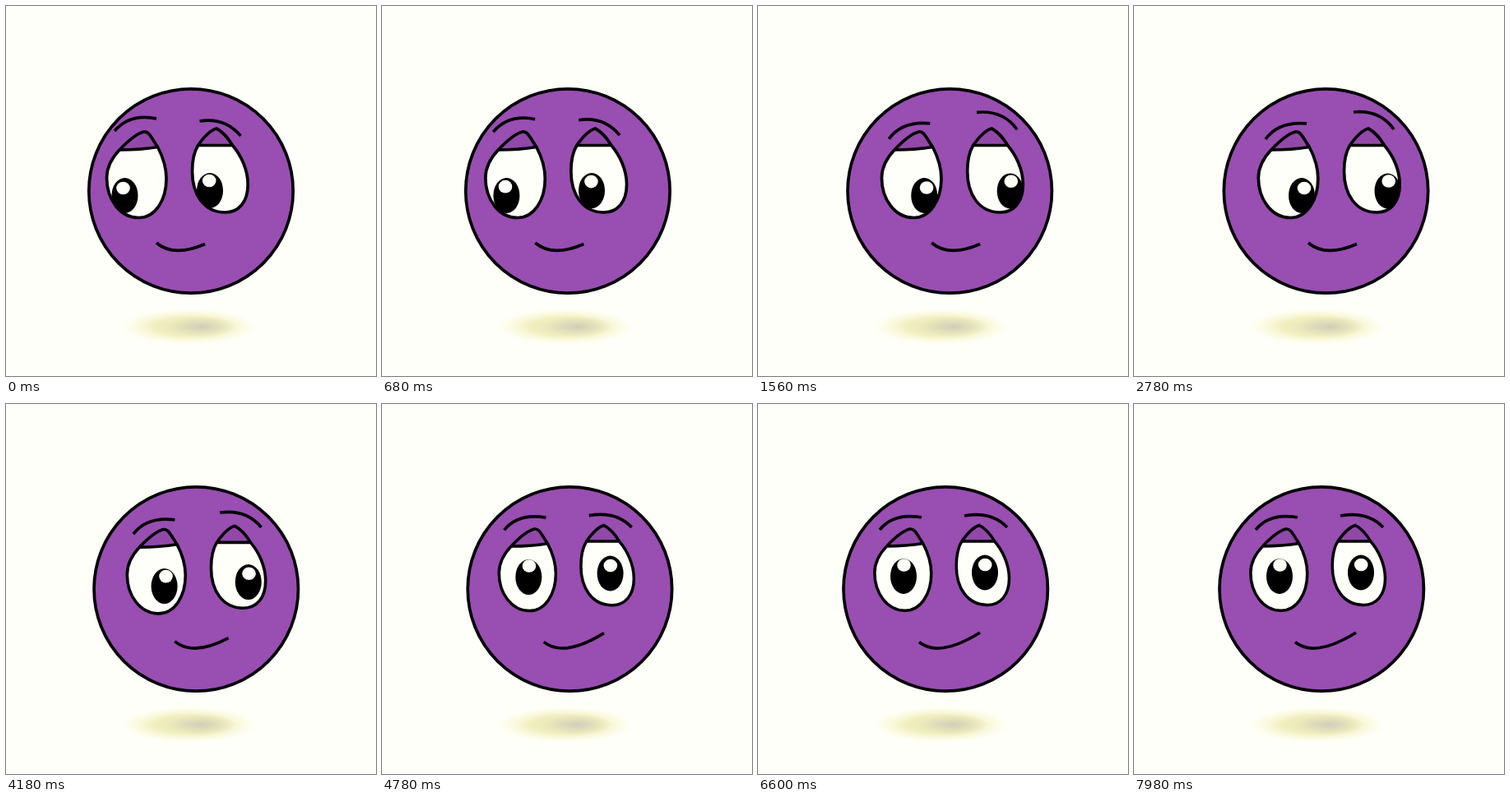
An HTML page for the animation above (8 s loop, 450 px wide and 450 px high).

```html
<!DOCTYPE html>
<html lang="en">
<head>
<meta charset="utf-8">
<title>Purple face</title>
<style>
  html, body { margin: 0; width: 100%; height: 100%; overflow: hidden; background: #fffffa; }
  svg { display: block; width: 100%; height: 100%; }
  .line { fill: none; stroke: #000; stroke-width: 3.7; }
  .white { fill: #fffffa; }
  .lid { fill: #9148a9; }
</style>
</head>
<body>
<svg viewBox="0 0 450 450">
  <defs>
    <radialGradient id="glow">
      <stop offset="0" stop-color="#e6e4b8"/>
      <stop offset=".5" stop-color="#efedb8" stop-opacity=".9"/>
      <stop offset="1" stop-color="#fbf9c8" stop-opacity="0"/>
    </radialGradient>
    <radialGradient id="core">
      <stop offset="0" stop-color="#cfcdb8"/>
      <stop offset="1" stop-color="#dcdab8" stop-opacity="0"/>
    </radialGradient>
    <path id="shapeL" d="M-21.5 22C-12 12 0 2 8 0C14 -1 16 5 25 18.5C31 30 35.5 44 35.5 57C35.5 83 22 104.5 2 104.5C-21 104.5 -37 82 -37 56C-37 43 -30 31 -21.5 22Z"/>
    <path id="shapeR" d="M-27 20.5C-21 12 -12 2 -4.5 0C3 4 10 12 15 20.5C25 32 33.7 50 33.7 68C33.7 90 22 102 6 102C-20 102 -34 80 -34 52C-34 40 -32 29 -27 20.5Z"/>
    <clipPath id="clipL"><use href="#shapeL"/></clipPath>
    <clipPath id="clipR"><use href="#shapeR"/></clipPath>
  </defs>
  <rect width="450" height="450" class="white"/>
  <ellipse cx="223" cy="390" rx="84" ry="22" fill="url(#glow)"/>
  <ellipse cx="238" cy="390" rx="42" ry="13" fill="url(#core)"/>
  <circle id="head" cy="225" r="124.2" fill="#994eb2" stroke="#000" stroke-width="3.7"/>
  <g id="eyeL">
    <use href="#shapeL" class="white"/>
    <g clip-path="url(#clipL)">
      <path class="lid" d="M-21.5 22Q4 22 25 18.5L40 -5H-40Z"/>
      <g id="pupilL"><ellipse rx="16" ry="21.5"/><ellipse id="glintL" class="white" rx="8.3" ry="7.8"/></g>
    </g>
    <path class="line" d="M-21.5 22Q4 22 25 18.5"/>
    <use href="#shapeL" class="line"/>
  </g>
  <g id="eyeR">
    <use href="#shapeR" class="white"/>
    <g clip-path="url(#clipR)">
      <path class="lid" d="M-27 20.5H15L40 -5H-40Z"/>
      <g id="pupilR"><ellipse rx="16" ry="21.5"/><ellipse id="glintR" class="white" rx="8.3" ry="7.8"/></g>
    </g>
    <path class="line" d="M-27 20.5H15"/>
    <use href="#shapeR" class="line"/>
  </g>
  <path id="browL" class="line"/>
  <path id="browR" class="line"/>
  <path id="mouth" class="line"/>
</svg>
<script>
const LOOP = 8000;
const $ = id => document.getElementById(id);

// head: x, look, eye scale; curves: start, control, end
const left = {
  head: [225, -1, 1], eyes: [159.5, 153, 260.5, 149], pupils: [144.5, 230.5, 248, 224.5],
  browL: [132, 152, 151, 130, 183, 137], browR: [235.5, 140, 266, 135, 285.5, 158],
  mouth: [183, 288, 204, 306, 242, 289.5]
};
const right = {
  head: [233.5, 1, 1], eyes: [188.3, 153, 289.5, 149], pupils: [204, 230.5, 308.5, 225],
  browL: [160, 162, 176, 140, 210, 143], browR: [267, 129, 299, 126, 316, 150],
  mouth: [212, 288, 233, 306, 271, 289.5]
};
const front = {
  head: [228.2, 0, .95], eyes: [177, 152, 273.5, 147.5], pupils: [177, 209.5, 276, 205],
  browL: [148, 153, 165, 132, 199, 138], browR: [251, 136, 284, 130, 303, 150],
  mouth: [196, 289.5, 220, 309, 270, 278]
};

// Steps come in threes: one held for 100 ms, then two of 20 ms.
function stepAt(t) {
  const round = Math.floor((t - 20) / 140);
  const rest = t - 20 - round * 140;
  return 3 * round + 1 + (rest >= 100) + (rest >= 120);
}

// cubic-bezier(.25, .1, .25, 1)
function ease(x) {
  if (x <= 0) return 0;
  if (x >= 1) return 1;
  const bezier = (s, a, b) => 3 * s * (1 - s) * ((1 - s) * a + s * b) + s ** 3;
  let lo = 0, hi = 1;
  for (let i = 0; i < 20; i++) {
    const mid = (lo + hi) / 2;
    if (bezier(mid, .25, .25) < x) lo = mid; else hi = mid;
  }
  return bezier(lo, .1, 1);
}

function blend(a, b, p) {
  const out = {};
  for (const k in a) out[k] = a[k].map((v, i) => v + (b[k][i] - v) * p);
  return out;
}

function place(side, ex, ey, px, py, s, gx, gy) {
  $('eye' + side).setAttribute('transform', `translate(${ex} ${ey}) scale(${s})`);
  $('pupil' + side).setAttribute('transform',
    `translate(${(px - ex) / s} ${(py - ey) / s}) scale(${1 / s})`);
  $('glint' + side).setAttribute('cx', gx);
  $('glint' + side).setAttribute('cy', gy);
}

function draw(t) {
  const step = stepAt(t);
  const pose = step < 60
    ? blend(left, right, ease((step - 10.6) / 30))
    : blend(right, front, ease((step - 81.3) / 30));
  const [x, look, s] = pose.head;
  const [lx, ly, rx, ry] = pose.eyes;
  const [plx, ply, prx, pry] = pose.pupils;
  $('head').setAttribute('cx', x);
  place('L', lx, ly, plx, ply, s, .5 + 2.5 * look, -13.5 + 4.5 * look * look);
  place('R', rx, ry, prx, pry, s, .2 + look, -9.5 - 2.5 * look * look);
  for (const id of ['browL', 'browR', 'mouth']) {
    const [a, b, c, d, e, f] = pose[id];
    $(id).setAttribute('d', `M${a} ${b}Q${c} ${d} ${e} ${f}`);
  }
}

const begin = performance.now();
function tick() {
  draw((performance.now() - begin) % LOOP);
  requestAnimationFrame(tick);
}
tick();
</script>
</body>
</html>
```
